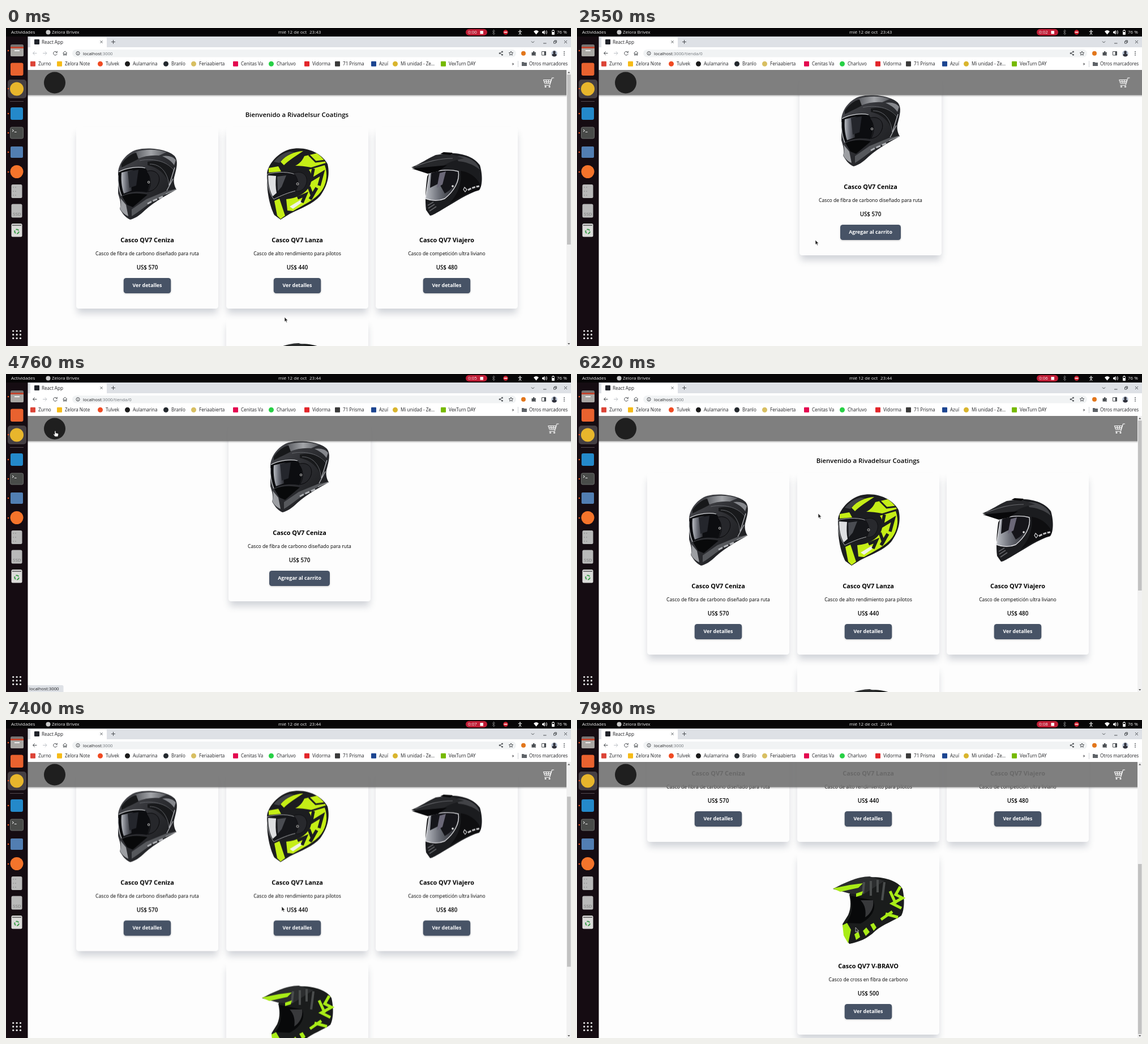
Animation, 998 px wide and 561 px high, one loop 8000 ms. Source, as an HTML page:

```html
<!DOCTYPE html>
<html lang="es">
<head>
<meta charset="utf-8">
<title>Tienda</title>
<style>
html, body { margin: 0; width: 100%; height: 100%; overflow: hidden; background: #fdfdfd; }
svg { display: block; }
text { font: 8.1px "Open Sans", "Noto Sans", sans-serif; fill: #202124; white-space: pre; }
.bar text { fill: #f0f0f0; font-size: 8px; }
.mid { text-anchor: middle; }
.url { font-size: 7.8px; }
.dim { fill: #70757a; }
.hello { font-size: 11.4px; font-weight: 600; fill: #000; }
.name { font-size: 10.9px; font-weight: 700; fill: #000; }
.desc { font-size: 8.6px; fill: #000; }
.price { font-size: 9.8px; font-weight: 600; fill: #000; }
.btn { font-size: 8.8px; font-weight: 700; fill: #fff; }
.line { fill: none; stroke: #4b4f53; stroke-width: 1; }

.cut { animation: 8s step-end infinite; }
.move { animation: 8s ease-in-out infinite; }
#home, .bars { animation-name: home; }
#hello, .rootUrl { animation-name: hello; }
#detail, .itemUrl { animation-name: detail; }
#empty { animation-name: empty; }
#full { animation-name: full; }
#cart { animation-name: cart; }
#back { animation-name: back; }
#tipItem { animation-name: tipItem; }
#tipRoot { animation-name: tipRoot; }
#min43 { animation-name: min43; }
#min44 { animation-name: min44; }
#secs { animation-name: secs; }
#hand { animation-name: hand; }
#arrow { animation-name: arrow; }
#scroll { animation-name: scroll; }
#thumb { animation-name: thumb; }
#cursor { animation-name: cursor; }

@keyframes home { 0% { opacity: 1 } 16.125% { opacity: 0 } 67.25%, 100% { opacity: 1 } }
@keyframes hello { 0% { opacity: 1 } 16.125% { opacity: 0 } 64.75%, 100% { opacity: 1 } }
@keyframes detail { 0% { opacity: 0 } 16.125% { opacity: 1 } 64.75%, 100% { opacity: 0 } }
@keyframes empty { 0% { opacity: 1 } 19%, 100% { opacity: 0 } }
@keyframes full { 0% { opacity: 0 } 19%, 100% { opacity: 1 } }
@keyframes cart { 0% { transform: none } 16.125% { transform: translateX(8.5px) } 67.25%, 100% { transform: none } }
@keyframes back { 0% { stroke: #bdc1c6 } 16.125%, 100% { stroke: #4b4f53 } }
@keyframes tipItem { 0% { opacity: 0 } 11.9% { opacity: 1 } 21.5%, 100% { opacity: 0 } }
@keyframes tipRoot { 0% { opacity: 0 } 59% { opacity: 1 } 70.5%, 100% { opacity: 0 } }
@keyframes min43 { 0% { opacity: 1 } 49.4%, 100% { opacity: 0 } }
@keyframes min44 { 0% { opacity: 0 } 49.4%, 100% { opacity: 1 } }
@keyframes secs {
  0% { transform: none } 9.5% { transform: translateY(-20px) } 22% { transform: translateY(-40px) }
  34.4% { transform: translateY(-60px) } 46.9% { transform: translateY(-80px) } 59.4% { transform: translateY(-100px) }
  71.9% { transform: translateY(-120px) } 84.25% { transform: translateY(-140px) } 96.9%, 100% { transform: translateY(-160px) }
}
@keyframes hand { 0% { opacity: 0 } 11% { opacity: 1 } 16.125% { opacity: 0 } 58% { opacity: 1 } 70.8%, 100% { opacity: 0 } }
@keyframes arrow { 0% { opacity: 1 } 11% { opacity: 0 } 16.125% { opacity: 1 } 58% { opacity: 0 } 70.8%, 100% { opacity: 1 } }
@keyframes scroll {
  0%, 89.1% { transform: translateY(0); animation-timing-function: ease-in }
  92.5% { transform: translateY(-87px); animation-timing-function: linear }
  96.5% { transform: translateY(-220px); animation-timing-function: ease-out }
  99.7%, 100% { transform: translateY(-280px) }
}
@keyframes thumb {
  0%, 89.1% { transform: translateY(0); animation-timing-function: ease-in }
  92.5% { transform: translateY(53px); animation-timing-function: linear }
  96.5% { transform: translateY(135px); animation-timing-function: ease-out }
  99.7%, 100% { transform: translateY(172px) }
}
@keyframes cursor {
  0%, 2% { transform: translate(492px, 510px) }
  11.5%, 24.6% { transform: translate(262px, 453px) }
  31.5%, 34.7% { transform: translate(421px, 374px) }
  43.1%, 49.1% { transform: translate(233px, 257px) }
  58.5%, 69.9% { transform: translate(86px, 100px) }
  77.75% { transform: translate(426px, 246px) }
  84.2%, 93.5% { transform: translate(487px, 329px) }
  99%, 100% { transform: translate(492px, 366px) }
}
</style>
</head>
<body>
<svg width="998" height="561" viewBox="0 0 998 561">
<defs>
  <filter id="soft" x="-20%" y="-20%" width="140%" height="140%"><feGaussianBlur stdDeviation="6.5"/></filter>
  <filter id="tight" x="-20%" y="-20%" width="140%" height="160%"><feGaussianBlur stdDeviation="1.5"/></filter>
  <linearGradient id="shell" x1="0" y1="0" x2="1" y2="1">
    <stop offset="0" stop-color="#4a4b50"/><stop offset=".5" stop-color="#2b2c30"/><stop offset="1" stop-color="#151618"/>
  </linearGradient>
  <linearGradient id="shine" x2="1">
    <stop offset="0" stop-color="#5b5d62"/><stop offset=".5" stop-color="#a3a5a9"/><stop offset="1" stop-color="#55575c"/>
  </linearGradient>
  <linearGradient id="glass" x2="1">
    <stop offset="0" stop-color="#b9bcc2"/><stop offset=".4" stop-color="#6d7079"/><stop offset="1" stop-color="#15161a"/>
  </linearGradient>
  <linearGradient id="navShade" x2="0" y2="1">
    <stop offset="0" stop-color="#000" stop-opacity=".22"/><stop offset="1" stop-color="#000" stop-opacity="0"/>
  </linearGradient>
  <clipPath id="view"><path d="M38 74H998V561H38Z"/></clipPath>
  <clipPath id="pill"><path d="M813 2H837V13H813Z"/></clipPath>

  <g id="road">
    <path fill="url(#shell)" d="M74 80C76 62 90 46 106 41C128 35 162 40 174 52C181 61 177 74 174 86C171 95 173 104 177 111C160 121 140 131 122 147C112 157 102 163 95 164C86 160 81 152 77 145C80 136 77 128 74 118Z"/>
    <path fill="url(#shine)" d="M104 45C122 39 144 40 160 45L146 51C132 50 120 52 108 57Z"/>
    <path fill="#17181a" d="M80 66C88 54 98 48 106 46L110 57C100 62 88 68 80 72Z"/>
    <path fill="#85878c" d="M152 52C162 50 172 53 176 59L173 68C168 60 160 56 152 52Z"/>
    <path fill="#18191b" d="M126 62C146 58 162 64 172 74L166 104C158 84 146 72 126 68Z"/>
    <path fill="none" stroke="#65676c" d="M112 60C140 54 164 64 173 78M130 66C150 66 162 82 164 104"/>
    <path fill="#0c0d10" d="M75 80C90 72 110 70 122 73C132 84 132 102 125 116C108 113 92 115 80 122C76 108 74 92 75 80Z"/>
    <path fill="url(#glass)" d="M80 81L101 76C97 90 97 102 98 113L84 118C80 106 79 92 80 81Z"/>
    <path fill="#24262c" d="M91 79L110 76L106 104L94 108Z"/>
    <path fill="none" stroke="#d5d7da" stroke-width="1.2" d="M75 80C90 72 110 70 122 73M74 86C73 102 76 112 80 122"/>
    <path fill="#26272b" stroke="#08080a" d="M124 79C138 74 150 84 146 98C142 110 134 114 126 115C133 104 133 90 124 79Z"/>
    <circle cx="128" cy="98" r="1.8" fill="#222" stroke="#ddd" stroke-width=".8"/>
    <path fill="#9d9fa3" d="M78 126L88 138L92 158C86 156 80 150 77 144C80 138 79 132 78 126Z"/>
    <path fill="#08090a" d="M81 123C96 116 112 117 126 120L100 142L90 138Z"/>
    <path fill="#56585c" d="M98 146L124 128L158 114L176 110L146 126C126 136 112 150 98 158Z"/>
    <path fill="none" stroke="#b2b4b8" stroke-width="3" stroke-dasharray="8 3" d="M126 136C134 131 144 128 156 122"/>
    <path fill="none" stroke="#b0b2b6" stroke-width="1.3" d="M160 113L171 92M158 119L176 111M174 72L164 104"/>
  </g>

  <g id="race">
    <path fill="#1c1d20" d="M72 82C75 64 92 46 112 40C142 33 170 48 179 66C184 86 178 106 166 122C154 136 132 144 112 154L96 164L85 156C77 140 71 116 72 82Z"/>
    <path fill="#404246" d="M84 62C92 52 102 46 112 44L120 45C108 50 100 56 94 64Z"/>
    <g fill="#c5ee16">
      <path d="M96 62C106 50 120 44 136 43L118 55C112 59 106 64 102 68Z"/>
      <path d="M138 52L160 47C167 52 173 58 176 64L150 72C140 70 130 69 122 69C130 65 135 59 138 52Z"/>
      <path d="M75 73L92 70L97 79L75 81Z"/>
      <path d="M174 68C180 84 177 102 168 114C156 130 136 138 118 149L108 148L106 128C126 126 140 118 148 104C152 94 152 84 146 76Z"/>
      <path d="M85 131L94 127L104 157L96 163L90 157Z"/>
    </g>
    <path fill="#f0f2e6" d="M112 141L130 130L136 132L118 145Z"/>
    <path fill="none" stroke="#1c1d20" stroke-width="5.5" d="M154 74L150 94L170 82L164 104M146 106L152 122L160 108L148 128M126 126L140 120L134 134"/>
    <path fill="none" stroke="#1c1d20" stroke-width="3" d="M146 50L158 62L174 60"/>
    <path fill="#15161a" stroke="#cfd0d2" stroke-width=".8" d="M72 84C90 79 112 79 126 86C131 98 129 108 124 113C110 116 96 122 84 128C76 118 72 104 72 84Z"/>
    <path fill="#dedfe1" d="M74 86L88 87C87 98 87 108 89 117L82 123C76 112 74 100 74 86Z"/>
    <path fill="#4a4c52" d="M90 88L106 86L98 106L91 114Z"/>
    <path fill="#28292d" stroke="#0c0c0e" stroke-width=".8" d="M119 82C136 76 146 88 141 102C137 112 130 115 122 114C129 104 128 92 119 82Z"/>
    <circle cx="126" cy="101" r="2" fill="#222" stroke="#ddd" stroke-width=".8"/>
  </g>

  <g id="trail">
    <path fill="#1b1c1f" d="M112 50C140 42 172 50 184 68C189 84 189 104 183 112C162 118 142 132 118 146C108 152 100 157 96 157L89 147C87 130 88 110 91 88Z"/>
    <path fill="#424347" d="M142 52C164 51 180 62 184 76C172 66 158 62 146 61Z"/>
    <path fill="#0e0e10" d="M150 78C168 80 180 92 186 104L182 112C164 116 146 126 130 136C148 116 152 98 150 78Z"/>
    <path fill="url(#glass)" stroke="#e0e0e4" stroke-width="1.4" d="M95 82C112 76 132 75 146 79C149 96 138 114 122 127C108 133 96 130 88 127Z"/>
    <path fill="#15151a" d="M98 82C112 77 132 76 145 80C147 96 136 110 122 118L112 100L96 108Z"/>
    <path fill="#6b6878" d="M113 82L124 79L118 102L108 108Z"/>
    <path fill="#27282b" d="M63 72C80 65 92 56 106 50L128 47L156 56C134 60 120 66 110 78L92 82C84 77 74 75 63 72Z"/>
    <path fill="#08080a" d="M64 74C82 72 106 70 126 68L110 79L92 83Z"/>
    <path fill="none" stroke="#66676b" stroke-width="1.2" d="M70 70C90 63 108 56 136 56"/>
    <path fill="#08080a" d="M114 48L120 45L136 46L132 50Z"/>
    <circle cx="136" cy="105" r="1.8" fill="#eee"/>
    <path fill="none" stroke="#d2d2d4" stroke-width="1.2" d="M157 107L161 111L158 115L155 111Z"/>
    <path fill="none" stroke="#c2c2c4" stroke-width="3" stroke-dasharray="6 2" d="M163 112C170 108 176 106 183 105"/>
    <path fill="none" stroke="#606165" stroke-width="2" d="M92 139L102 133M93 144L104 137M95 149L107 141"/>
  </g>

  <g id="cross">
    <path fill="#1a1c1c" d="M108 47C138 38 176 46 186 64C191 86 188 104 184 111C172 120 152 126 138 138C124 152 108 158 92 161L84 149L80 126L90 110C96 96 94 84 92 74Z"/>
    <path fill="#2b2d2e" d="M63 64C82 54 106 42 128 42L154 50L116 74L92 72Z"/>
    <path fill="#a9ec17" d="M63 63L93 57L116 54L108 62L76 69Z"/>
    <path fill="#08090a" d="M94 76L134 84C141 100 130 116 112 125L87 124C98 108 98 94 94 76Z"/>
    <path fill="#38393b" d="M112 84L134 84C136 96 130 108 120 114C122 104 120 92 112 84Z"/>
    <path fill="none" stroke="#4a4d4d" stroke-width="4" d="M118 52L116 72M130 50L130 76M142 48L142 70M154 52L150 84"/>
    <path fill="none" stroke="#a9ec17" stroke-width="5" d="M182 60L174 74L186 80L168 90L184 98M164 68L174 90M148 118L168 104M156 108L178 114"/>
    <g fill="#a9ec17">
      <path d="M80 128L88 124L95 136L90 160L82 146Z"/>
      <path d="M101 144L108 139L111 149L104 154ZM116 138L122 132L128 140L121 147ZM129 127L135 124L140 132L135 138Z"/>
      <path d="M104 72L116 68L114 75L104 78Z"/>
    </g>
  </g>
</defs>

<rect width="998" height="561" fill="#fdfdfd"/>

<!-- page -->
<g clip-path="url(#view)">
  <g id="scroll" class="move">
    <text id="hello" class="hello mid cut" x="514" y="157">Bienvenido a Rivadelsur Coatings</text>
    <g id="home" class="cut"></g>
  </g>
  <g id="detail" class="cut"><g id="empty" class="cut"></g><g id="full" class="cut"></g></g>
  <path fill="#737373" fill-opacity=".91" d="M38 74H998V118.5H38Z"/>
  <path fill="url(#navShade)" d="M38 118.5H998V122H38Z"/>
  <circle cx="86" cy="96.5" r="19" fill="#1f1f1f"/>
  <g id="cart" class="cut" fill="none" stroke="#fff" stroke-width="1.1">
    <path d="M968 88H964.5L960.5 101H951M949.5 91.5H963L961 97.5H951.5ZM954 91.5L955 97.5M958.5 91.5L958 97.5M950.5 94.5H962"/>
    <circle cx="953" cy="103.5" r="1"/><circle cx="960" cy="103.5" r="1"/>
  </g>
  <g class="bars cut">
    <path fill="#f1f1f1" d="M990 74H998V561H990Z"/>
    <path id="thumb" class="move" fill="#c1c1c1" d="M991 82H997.5V382H991Z"/>
    <path fill="#555" d="M992 79.5L994.2 77L996.4 79.5ZM992 556L994.2 558.5L996.4 556Z"/>
  </g>
  <g id="tipItem" class="cut">
    <path fill="#dee1e6" d="M38 549H134Q136.5 549 136.5 551.5V561H38Z"/>
    <text class="url" x="41" y="557.8">localhost:3000/tienda/0</text>
  </g>
  <g id="tipRoot" class="cut">
    <path fill="#dee1e6" d="M38 549H99Q101.5 549 101.5 551.5V561H38Z"/>
    <text class="url" x="41" y="557.8">localhost:3000</text>
  </g>
</g>

<!-- browser -->
<path fill="#dee1e6" d="M38 15H998V34H38Z"/>
<path fill="#fff" d="M38 34H998V74H38ZM43 34V19Q43 16 46 16H175Q178 16 178 19V34Z"/>
<rect x="50" y="20" width="9" height="9" rx="1" fill="#20232a"/>
<text x="63" y="27.5">React App</text>
<path class="line" d="M166.5 22.5L170.5 26.5M170.5 22.5L166.5 26.5M186 24.5H193M189.5 21V28M928 23.5L930.5 26L933 23.5M949 27H954.5M986 22L991 27M991 22L986 27M967.5 23.5H971V27H967.5ZM969 23.5V22H972.5V25.5H971"/>
<path id="back" class="line cut" d="M54.5 44.5H47.5M50.7 41.3L47.5 44.5L50.7 47.7"/>
<path class="line" style="stroke:#bdc1c6" d="M65 44.5H72M68.8 41.3L72 44.5L68.8 47.7"/>
<path class="line" d="M89.5 42.5A3.3 3.3 0 1 0 90.2 45.5M90.3 40.7V43.3H87.7M100.5 44.5L104.2 41L108 44.5M101.7 44V48H103.3V45.7H105.2V48H106.7V44"/>
<rect x="117" y="38" width="784" height="13.5" rx="6.7" fill="#f1f3f4"/>
<circle class="line" cx="127" cy="44.7" r="3.1"/>
<path class="line" d="M127 44.2V46.5M127 42.5V43.3M876.5 42L872 44.5L876.5 47M892 41L893.1 43.5L895.7 43.7L893.7 45.5L894.3 48L892 46.6L889.7 48L890.3 45.5L888.3 43.7L890.9 43.5Z"/>
<path fill="#4b4f53" d="M875.3 40.8h2.4v2.4h-2.4zM875.3 46h2.4v2.4h-2.4zM870.8 43.4h2.4v2.4h-2.4zM928.5 43H931V41H933.5V43H936V45.5H934.5V46.5H936V48.5H928.5Z"/>
<text class="url rootUrl cut" x="136" y="47.5">localhost<tspan class="dim">:3000</tspan></text>
<text class="url itemUrl cut" x="136" y="47.5">localhost<tspan class="dim">:3000/tienda/0</tspan></text>
<circle cx="914" cy="44.7" r="4" fill="#e2761b"/>
<path class="line" d="M946.5 41.5H953.5V48H946.5Z"/><path fill="#4b4f53" d="M950.5 41.5H953.5V48H950.5Z"/>
<circle cx="968.5" cy="44.7" r="5.3" fill="#b9c3d3"/>
<path fill="#30323c" d="M966.2 42.5a2.3 2.3 0 0 1 4.6 0q0 2-1 2.8q3 .7 3 3a5.3 5.3 0 0 1-8.6 0q0-2.3 3-3q-1-.8-1-2.8Z"/>
<g fill="#4b4f53"><circle cx="986" cy="41.7" r=".9"/><circle cx="986" cy="44.7" r=".9"/><circle cx="986" cy="47.7" r=".9"/></g>
<g id="marks"></g>
<text x="893.5" y="66">»</text>
<path stroke="#cfd2d6" d="M904.5 58V69"/>
<path fill="#5f6368" d="M911 60H914.5L915.5 61H920V67H911Z"/>
<text x="924" y="66">Otros marcadores</text>

<!-- dock -->
<path fill="#150c12" d="M0 15H38.5V561H0Z"/>
<rect x="3" y="91" width="33" height="33" rx="5" fill="#453f43"/>
<path stroke="#544a50" d="M7 129.5H31"/>
<g id="dots" fill="#e95420"></g>
<rect x="8" y="29" width="23" height="21" rx="2.5" fill="#777473"/>
<path fill="#c2452f" d="M8 33H31V36H8Z"/><path fill="#aaa7a4" d="M8 36H31V47.5Q31 50 28.5 50H10.5Q8 50 8 47.5Z"/><path fill="#eee" d="M15 39H24V41H15Z"/>
<rect x="8" y="61.5" width="22.5" height="22.5" rx="3" fill="#e9622f"/>
<circle cx="19" cy="107.5" r="12" fill="#e8b62c"/>
<rect x="8" y="140" width="22" height="22" rx="3" fill="#2489ca"/>
<rect x="7.5" y="175" width="23" height="20" rx="2.5" fill="#494b49" stroke="#6a6c6a"/>
<path fill="none" stroke="#fff" d="M11 179L13.5 181L11 183M15 183.5H18.5"/>
<rect x="8" y="209" width="22" height="20" rx="2" fill="#527eb2"/>
<circle cx="19" cy="253.5" r="11.5" fill="#f4742b"/>
<g fill="#b9b9b9"><rect x="9.5" y="276" width="19" height="24" rx="2.5"/><rect x="9.5" y="310.5" width="19" height="24" rx="2.5"/></g>
<path stroke="#888" stroke-dasharray="2 2" d="M12 281H18M12 288H20M12 295H18"/>
<text x="12" y="331" style="font-size:8px;fill:#777">SSD</text>
<rect x="9.5" y="345" width="19" height="23.5" rx="2.5" fill="#dcdcda"/><path fill="#777" d="M11 347H27V349H11Z"/>
<circle cx="19" cy="359" r="3.7" fill="none" stroke="#379b45" stroke-width="2" stroke-dasharray="5.5 2.2"/>
<g id="grid" fill="#eee"></g>

<!-- top bar -->
<path fill="#070607" d="M0 0H998V15H0Z"/>
<g class="bar">
  <text x="9" y="10.3">Actividades</text>
  <circle cx="74.5" cy="7.5" r="4" fill="#c9c9c9"/>
  <text x="81" y="10.3">Zelora Brivex</text>
  <text x="481" y="10.3">mié 12 de oct</text>
  <text id="min43" class="cut" x="536" y="10.3">23:43</text>
  <text id="min44" class="cut" x="536" y="10.3">23:44</text>
  <rect x="812" y="1.7" width="38" height="11.6" rx="5.8" fill="#c01c35"/>
  <g clip-path="url(#pill)"><g id="secs" class="cut"></g></g>
  <path fill="#fff" d="M837.5 5H843V10.5H837.5Z"/>
  <path fill="none" stroke="#777" stroke-width=".9" d="M859 5L863.5 9.7L861.2 12V3L863.5 5.3L859 10"/>
  <circle cx="882.5" cy="7.5" r="4.2" fill="#d3202f"/><path fill="#fff" d="M879.7 6.7H885.3V8.3H879.7Z"/>
  <circle cx="908" cy="4.5" r="1.1" fill="#fff"/><path fill="none" stroke="#fff" d="M904.8 6.5H911.2M908 6.5V9M908 8.5L906 12M908 8.5L910 12"/>
  <path fill="#fff" d="M932 6Q936.5 2 941 6L936.5 11.5ZM947 6H949L951.5 3.7V11.5L949 9.3H947Z"/>
  <path fill="none" stroke="#fff" stroke-width=".8" d="M953 5.5Q954.5 7.5 953 9.7M954.5 4Q957 7.5 954.5 11M964.5 4.5H968.5V11.5H964.5Z"/>
  <path fill="#fff" d="M965.5 3H967.5V4.5H965.5ZM964.5 7H968.5V11.5H964.5Z"/>
  <text x="973" y="10.3">76 %</text>
</g>

<g id="cursor" class="move">
  <path id="arrow" class="cut" fill="#222" stroke="#fff" stroke-width=".6" d="M0 0V8.3L1.9 6.6L3.2 9.5L4.6 8.9L3.3 6.1H5.8Z"/>
  <path id="hand" class="cut" fill="#fff" stroke="#222" stroke-width=".6" d="M0 .8Q1 -.4 1.9 .8V4L6 5Q6.8 5.5 6.5 7L5.5 10.5H.8L-2.3 6.7Q-2.2 5.5 -1 6L0 7Z"/>
</g>
</svg>
<script>
const put = (id, html) => document.getElementById(id).innerHTML = html;
const label = (cls, y, s) => `<text class="${cls} mid" x="125.5" y="${y}">${s}</text>`;

// dy lifts the price and button while the texts are still missing
function card(x, y, art, name, desc, price, action = 'Ver detalles', w = 83.5, dy = 0) {
  const h = 321 - dy, left = 125.5 - w / 2, top = 267 - dy;
  return `<g transform="translate(${x} ${y})">
    <rect x="2" y="12" width="247" height="${h - 4}" fill="#1e2a45" opacity=".2" filter="url(#soft)"/>
    <rect width="251" height="${h}" rx="4.5" fill="#fdfdfd"/>
    <use href="#${art}"/>
    ${label('name', 204.4, name)}${label('desc', 227, desc)}${label('price', 252 - dy, 'US$ ' + price)}
    <rect x="${left}" y="${top + 2}" width="${w}" height="26" rx="4.5" opacity=".2" filter="url(#tight)"/>
    <rect x="${left}" y="${top}" width="${w}" height="27" rx="4.5" fill="#475366"/>
    ${label('btn', 283.3 - dy, action)}</g>`;
}

const road = ['road', 'Casco QV7 Ceniza', 'Casco de fibra de carbono diseñado para ruta', 570];
put('home',
  card(389, 514, 'cross', 'Casco QV7 V-BRAVO', 'Casco de cross en fibra de carbono', 500) +
  card(124, 174, ...road) +
  card(389, 174, 'race', 'Casco QV7 Lanza', 'Casco de alto rendimiento para pilotos', 440) +
  card(653, 174, 'trail', 'Casco QV7 Viajero', 'Casco de competición ultra liviano', 480));
put('empty', card(393, 80, 'road', '', '', '', 'Agregar al carrito', 107, 29));
put('full', card(393, 80, ...road, 'Agregar al carrito', 107));

// x of the text, label, icon colour, round icon
put('marks', [
  [57, 'Zurno', '#dc4437'], [104, 'Zelora Note', '#f6bb17'], [176, 'Tulvek', '#f04a22', 1],
  [224, 'Aulamarina', '#1b1b1b', 1], [292, 'Branlo', '#24292e', 1], [341, 'Feriaabierta', '#d8bf62', 1],
  [415, 'Cenitas Va', '#e4094f'], [478, 'Charluvo', '#27d045', 1], [541, 'Vidorma', '#e3262b'],
  [595, '71 Prisma', '#3a3a3a'], [659, 'Azuí', '#1c4591'], [697, 'Mi unidad - Ze…', '#d9b52e', 1],
  [782, 'VexTurn DAY', '#76b900']
].map(([x, s, c, round]) =>
  `<rect x="${x - 14}" y="58.7" width="9" height="9" rx="${round ? 4.5 : 1}" fill="${c}"/><text x="${x}" y="66">${s}</text>`).join(''));

put('dots', [40, 107, 151, 185, 219, 254].map(y => `<circle cx="4" cy="${y}" r="1.3"/>`).join(''));
put('grid', [...Array(9).keys()].map(i =>
  `<circle cx="${12.7 + i % 3 * 6.4}" cy="${534.5 + (i / 3 | 0) * 6.4}" r="1.6"/>`).join(''));
put('secs', [...Array(9).keys()].map(i => `<text x="816" y="${10.3 + i * 20}">0:0${i}</text>`).join(''));
</script>
</body>
</html>
```
